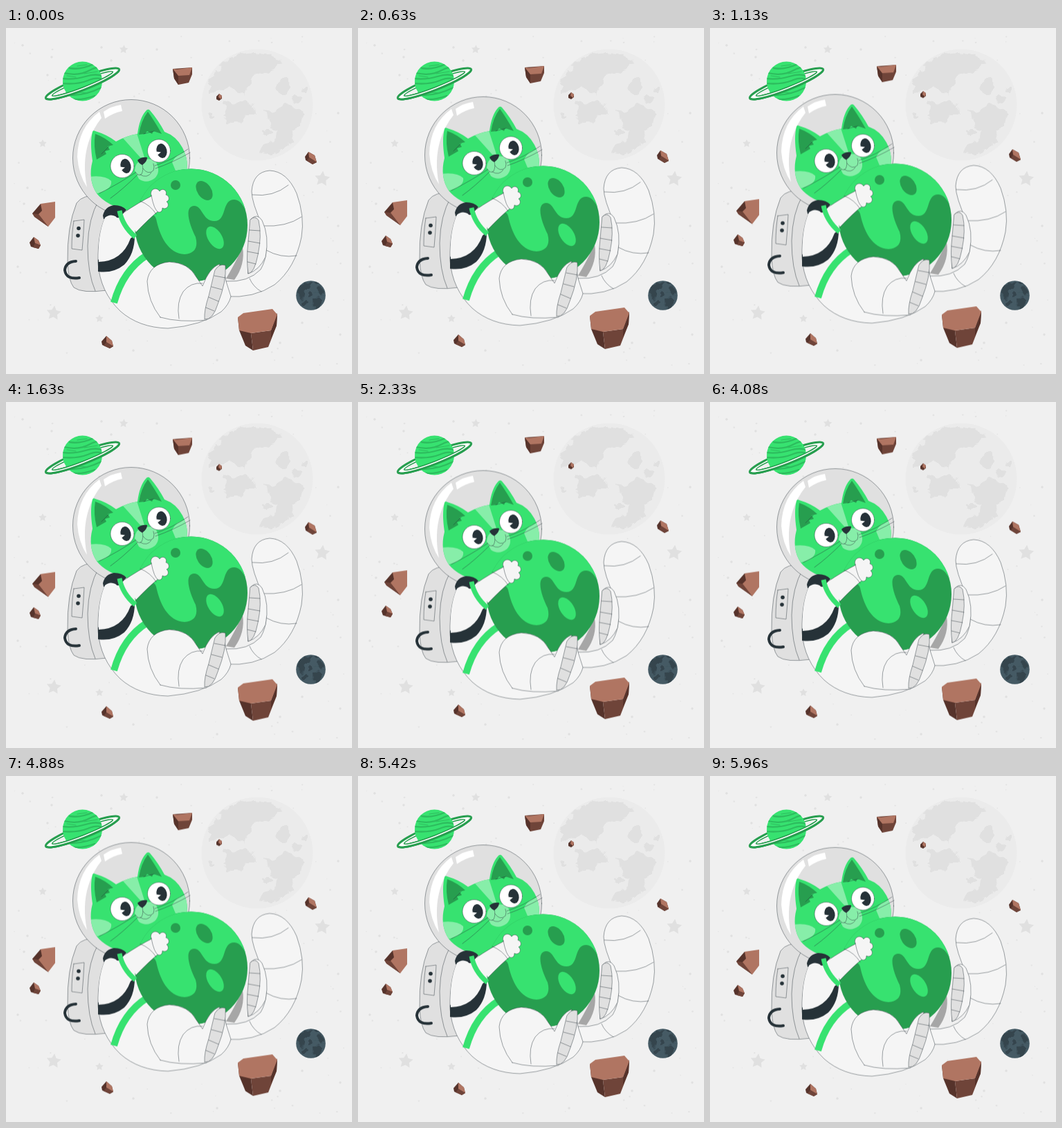
Animation, 500 px wide and 500 px high, one loop 6 s. Source, as an HTML page:

```html
<!DOCTYPE html>
<html lang="en">
<head>
<meta charset="utf-8">
<title>Floating space cat</title>
<style>
html, body { margin: 0; width: 100%; height: 100%; overflow: hidden; background: #f0f0f0; }
svg { display: block; width: 100vw; height: 100vh; }
.float { animation: float 3s linear infinite; }
.drift { animation: float 6s linear infinite; }
@keyframes float { 50% { transform: translateY(-10px); } }
.lime { fill: #37e270; }
.leaf { fill: #279e4f; }
.mint { fill: #87eea9; }
.suit { fill: #f5f5f5; }
.white { fill: #fff; }
.grey { fill: #e0e0e0; }
.ink { fill: #263238; }
.line { stroke: #263238; stroke-width: .45; stroke-linejoin: round; stroke-linecap: round; }
.open { fill: none; }
.lit { fill: #b07562; }
.mid { fill: #6f4439; }
.dark { fill: #56332b; }
</style>
</head>
<body>
<svg viewBox="0 0 500 500">
  <defs>
    <filter id="rough" x="-10%" y="-10%" width="120%" height="120%">
      <feTurbulence type="fractalNoise" baseFrequency=".09" numOctaves="2" seed="4"/>
      <feDisplacementMap in="SourceGraphic" scale="13" xChannelSelector="R" yChannelSelector="G"/>
    </filter>
    <clipPath id="moonClip"><circle cx="363" cy="111" r="80"/></clipPath>
    <clipPath id="ringedClip"><circle cx="110.500" cy="77" r="28.500"/></clipPath>
    <clipPath id="ballClip"><circle cx="267.500" cy="285" r="81.500"/></clipPath>
    <clipPath id="darkClip"><circle cx="440.500" cy="386.500" r="21.300"/></clipPath>
    <clipPath id="headClip"><path id="headShape" d="M125 192 Q121 165 125 150 Q126 147 129 149 Q146 154 159 164 Q173 156 190 153 Q193 130 202 120 Q205 116 208 119 Q220 133 229 150 Q246 156 255 173 Q266 194 259 212 L230 250 L180 265 Q145 257 131 239 Q118 219 125 192Z"/></clipPath>
  </defs>

  <g id="sky" class="grey"></g>

  <circle cx="363" cy="111" r="80.500" fill="#ebebeb"/>
  <g clip-path="url(#moonClip)"><g class="grey" filter="url(#rough)">
    <path d="M292 82 Q305 54 330 41 Q352 31 374 40 Q393 42 393 54 Q387 66 370 65 Q357 66 355 77 Q346 87 345 97 L333 96 L322 84 Q311 94 292 94Z"/>
    <ellipse cx="400" cy="84" rx="10" ry="11"/>
    <ellipse cx="419" cy="103" rx="5" ry="7"/>
    <path d="M318 107 L329 110 L343 104 L357 112 L358 127 L346 127 L340 138 L321 136 L313 126Z"/>
    <path d="M376 118 L391 122 L402 111 L416 112 L429 122 L425 141 L413 148 L415 164 L397 177 L381 182 L366 179 L372 168 L391 163 L393 149 L382 144Z"/>
    <ellipse cx="386" cy="48" rx="12" ry="5"/>
    <ellipse cx="378" cy="151" rx="6" ry="4"/>
    <circle cx="297" cy="127" r="3"/>
    <circle cx="433" cy="89" r="3"/>
  </g></g>

  <!-- ringed planet: ring, globe, then the front half of the ring -->
  <g transform="rotate(-21.500 110.500 80.500)">
    <g id="ring" class="open">
      <path d="M58 80.500 A52.500 7.500 0 0 0 163 80.500" stroke="#fff" stroke-width="4"/>
      <path d="M53.500 80.500 A57 9 0 0 0 167.500 80.500" stroke="#279e4f" stroke-width="3"/>
      <path d="M63.500 80.500 A47 5 0 0 0 157.500 80.500" stroke="#279e4f" stroke-width="1.600"/>
    </g>
    <use href="#ring" transform="matrix(1 0 0 -1 0 161)"/>
  </g>
  <circle class="lime" cx="110.500" cy="77" r="28.500"/>
  <g clip-path="url(#ringedClip)" class="open" stroke="#2dbd5e" stroke-width="2.300" stroke-linecap="round">
    <path d="M92 58 Q107 61 127 52 M84 65 Q105 70 121 61 T139 65 M80 73 Q99 75 115 70 T140 70 M81 80 Q103 82 118 76 T140 75 M88 96 Q109 100 138 86 M98 103 Q112 104 128 98"/>
    <path stroke-width="1.200" d="M103 55 L117 53 M88 69 L101 71 M113 66 L132 63 M96 92 L118 94"/>
  </g>
  <use href="#ring" transform="rotate(-21.500 110.500 80.500)"/>

  <circle cx="440.500" cy="386.500" r="21.300" fill="#455a64"/>
  <g clip-path="url(#darkClip)"><g fill="#34444d" filter="url(#rough)">
    <path d="M422 378 L431 369 L444 367 L440 376 L432 379 L430 390 L423 391Z"/>
    <path d="M447 375 L455 373 L460 383 L454 388 L448 384Z"/>
    <path d="M443 391 L456 390 L455 400 L444 404Z"/>
    <ellipse cx="431" cy="396" rx="5" ry="4"/>
    <circle cx="441" cy="384" r="2.500"/>
    <circle cx="451" cy="368" r="2"/>
  </g></g>

  <g class="drift">
    <path class="mid" d="M241 59 L269 57 L269 67 L264 79 L249 82 L243 73Z"/>
    <path class="dark" d="M241 59 L249 69 L249 82 L243 73Z"/>
    <path class="lit" d="M241 59 L247 60 L269 57 L265 68 L249 69Z"/>
    <path class="dark" d="M38 268 L50 254 L56 260 L61 287 L42 273Z"/>
    <path class="mid" d="M38 268 L47 269 L61 287 L41 273Z"/>
    <path class="lit" d="M50 254 L71 251 L71 274 L61 287 L47 269 L52 264Z"/>
    <path class="dark" d="M34 310 L40 302 L47 307 L50 314 L47 319 L36 316Z"/>
    <path class="lit" d="M40 302 L47 307 L50 314 L42 311Z"/>
    <path class="mid" d="M42 311 L50 314 L47 319 L39 317Z"/>
    <path class="dark" d="M432 186 L437 179 L446 184 L449 194 L443 197 L433 191Z"/>
    <path class="lit" d="M437 179 L446 184 L449 194 L438 187Z"/>
    <path class="mid" d="M438 187 L449 194 L443 197 L435 192Z"/>
    <path class="dark" d="M138 453 L145 445 L153 452 L155 460 L150 463 L139 458Z"/>
    <path class="lit" d="M145 445 L153 452 L155 460 L145 454Z"/>
    <path class="mid" d="M145 454 L155 460 L150 463 L141 459Z"/>
    <path class="dark" d="M304 99 L308 95 L312 98 L312 102 L308 105 L304 103Z"/>
    <path class="lit" d="M308 95 L312 98 L311 103 L307 100Z"/>
    <path class="dark" d="M335 418 L354 441 L357 466 L346 459 L337 437Z"/>
    <path class="mid" d="M354 441 L383 437 L392 412 L391 430 L379 461 L357 466Z"/>
    <path class="dark" d="M392 412 L391 430 L383 449 L383 437Z"/>
    <path class="lit" d="M335 418 L343 412 L385 406 L392 414 L383 437 L354 441 L337 437Z"/>
  </g>

  <g class="float">
    <!-- tail -->
    <path class="suit line" d="M318 366 Q350 368 368 349 Q383 323 371 287 Q355 252 355 236 Q357 208 381 206 Q406 207 420 239 Q432 272 427 302 Q418 347 388 371 Q358 391 318 388Z"/>
    <path class="open line" d="M356 241 Q386 245 408 227 M371 286 Q405 288 427 273 M376 321 Q397 333 420 329 M352 362 Q357 374 369 381"/>

    <!-- backpack -->
    <path class="grey line" d="M134 243 Q111 240 102 253 Q88 287 89 338 Q90 365 98 375 Q110 384 146 379 L150 260Z"/>
    <path class="open line" d="M134 249 Q119 275 118 315 Q118 355 129 380 M98 279 L113 277 Q112 300 110 321 L95 319 Q95 296 98 279Z"/>
    <circle class="ink" cx="105" cy="289.500" r="2.800"/>
    <circle class="ink" cx="104" cy="300" r="2.800"/>
    <path class="open" stroke="#263238" stroke-width="4" stroke-linecap="round" d="M101 337 Q86 338 85 350 Q87 364 106 361"/>

    <!-- helmet -->
    <circle class="grey line" cx="181" cy="188" r="84.500"/>
    <path class="white" d="M135 121 Q104 144 103 186 Q105 212 117 230 Q110 195 119 166 Q125 146 138 130Z M141 121 Q152 113 166 111 L168 120 Q154 123 143 131Z"/>

    <!-- body -->
    <path class="suit line" d="M148 265 Q132 290 133 340 Q136 381 165 409 Q192 433 234 434 Q283 430 311 410 Q322 400 325 388 L318 366 L300 270 Q240 220 148 265Z"/>
    <path class="open" stroke="#37e270" stroke-width="10" d="M204 328 Q169 350 156 397"/>

    <!-- head -->
    <use href="#headShape" class="lime"/>
    <path class="leaf" d="M129 153 Q143 158 155 169 L147 171 L150 176 L143 178 L145 182 L131 190 Q126 170 129 153Z M205 121 Q215 135 225 153 L213 149 L211 153 L204 149 L201 153 L192 154 Q195 134 205 121Z"/>
    <g class="mint" clip-path="url(#headClip)">
      <path d="M168 158 L189 152 L200 187 L194 187Z"/>
      <path d="M119 215 Q143 212 152 221 Q154 233 132 239 L119 237Z"/>
      <path d="M240 194 Q246 181 264 178 L268 203 L245 206Z"/>
      <path d="M186 206 Q187 193 197 191 Q210 187 217 194 Q224 208 215 217 Q203 226 192 218Z"/>
    </g>
    <path class="open line" d="M138 182 L149 171 M199 153 L214 149"/>
    <g id="eyes"></g>
    <path class="ink" d="M190 191 Q196 186 204 187 Q204 193 197 198 Q192 196 190 191Z"/>
    <path class="open line" d="M197 197 Q199 205 196 211 Q191 215 187 208 M198 203 Q205 213 213 206 Q215 201 213 196 M194 212 Q204 218 210 209"/>
    <path class="open line" d="M187 209 Q163 225 135 239 M190 212 Q169 233 151 246 M215 199 Q240 191 263 175 M216 203 Q242 194 266 180"/>

    <!-- far foot -->
    <path class="suit line" d="M354 276 Q363 267 370 278 Q381 301 375 331 Q366 350 350 355Z"/>
    <path class="grey line" d="M353 277 Q360 270 365 278 Q370 300 364 328 Q359 354 350 355 Q347 334 350 309Z"/>
    <path class="open line" d="M352 292 L367 293 M350 308 L367 311 M349 323 L365 326 M349 338 L361 341"/>
    <path fill="#a6a6a6" d="M342 317 Q346 342 330 364 L318 362 Q330 342 342 317Z"/>

    <!-- held planet -->
    <circle class="leaf" cx="267.500" cy="285" r="81.500"/>
    <g clip-path="url(#ballClip)">
      <path class="lime" d="M180 298 Q195 282 206 273 Q214 267 217 276 C222 300 234 326 258 327 Q280 325 274 302 C266 286 256 258 272 257 C284 257 284 279 301 279 C320 279 311 248 330 248 Q344 249 351 279 L351 195 L180 195Z"/>
      <ellipse class="lime" cx="302" cy="303" rx="10" ry="18" transform="rotate(-32 302 303)"/>
      <circle class="leaf" cx="245" cy="227" r="7"/>
      <ellipse class="leaf" cx="286.500" cy="235" rx="10" ry="15.500" transform="rotate(-35 286.500 235)"/>
    </g>

    <!-- near leg -->
    <path class="suit line" d="M223 418 Q205 395 204 366 Q207 341 236 338 Q264 339 275 360 L284 373 Q294 346 309 341 L290 422 Q250 426 223 418Z"/>
    <path class="open line" d="M250 420 Q246 396 256 381 Q267 367 284 369"/>
    <path class="grey line" d="M302 350 Q308 340 317 343 Q319 366 306 399 Q299 422 287 421 Q286 408 293 387Z"/>
    <path class="open line" d="M301 358 L317 361 M297 374 L312 378 M293 389 L307 395 M289 404 L301 409"/>

    <!-- arm and straps -->
    <path class="ink" d="M140 271 Q143 258 156 256 Q168 256 174 263 L164 274 L141 276Z M186 300 Q186 326 171 342 Q155 355 133 352 L133 335 L176 300Z"/>
    <path class="suit" d="M134 338 Q132 300 143 274 Q150 268 158 272 L188 298 L180 304 Q168 337 134 338Z"/>
    <path class="suit line" d="M170 267 Q192 252 212 242 L222 263 Q207 275 188 295"/>
    <path class="open" stroke="#37e270" stroke-width="7" d="M164 264 Q168 286 187 302"/>
    <path class="suit line" d="M210 242 A6.500 6.500 0 1 1 222 236 A5 5 0 0 1 231 241 A5.200 5.200 0 0 1 232 251 A5 5 0 0 1 226 260 Q226 267 220 266 Q214 263 210 242Z"/>
    <path class="open line" d="M194 250 Q209 256 217 269"/>
  </g>
</svg>
<script>
const NS = "http://www.w3.org/2000/svg";

function add(parent, tag, attrs) {
  const el = document.createElementNS(NS, tag);
  for (const key in attrs) el.setAttribute(key, attrs[key]);
  parent.appendChild(el);
}

const sky = document.getElementById("sky");
const eyes = document.getElementById("eyes");

function star(x, y, r, turn) {
  const points = [];
  for (let i = 0; i < 10; i++) {
    const a = turn + i * Math.PI / 5 - Math.PI / 2;
    const d = i % 2 ? r * 0.5 : r;
    points.push((x + d * Math.cos(a)).toFixed(1) + "," + (y + d * Math.sin(a)).toFixed(1));
  }
  add(sky, "polygon", { points: points.join(" ") });
}

[[170, 31, 6.5, 0.1], [53, 167, 6, 0], [457, 218, 11.5, 0.1], [69, 412, 11, 0.1], [135, 420, 6, 0]]
  .forEach(s => star(...s));

const dots = [[24, 25], [66, 42], [152, 47], [138, 28], [218, 31], [60, 68], [205, 132], [31, 231],
  [26, 254], [17, 345], [184, 466], [305, 480], [396, 455], [428, 426], [483, 443], [480, 123], [480, 286]];
dots.forEach(([cx, cy]) => add(sky, "circle", { cx, cy, r: 1.7 }));

let seed = 11;
const random = () => (seed = seed * 16807 % 2147483647) / 2147483647;
for (let i = 0; i < 120; i++) {
  add(sky, "circle", { cx: 12 + random() * 476, cy: 12 + random() * 476, r: 0.5 + random() * 0.9, opacity: 0.8 });
}

// White ball and dark pupil with a small wedge cut out
function eye(x, y, r, shift) {
  const px = x + shift;
  add(eyes, "circle", { cx: x, cy: y, r, class: "white line" });
  add(eyes, "ellipse", { cx: px, cy: y, rx: 7.5, ry: 10.5, class: "ink", transform: `rotate(-12 ${px} ${y})` });
  add(eyes, "path", { d: `M${px - 8} ${y + 1} L${px - 1} ${y + 2} L${px - 6} ${y + 6}Z`, class: "white" });
}
eye(168, 199.5, 17, 5);
eye(221, 177.5, 16.5, 4);
</script>
</body>
</html>
```
